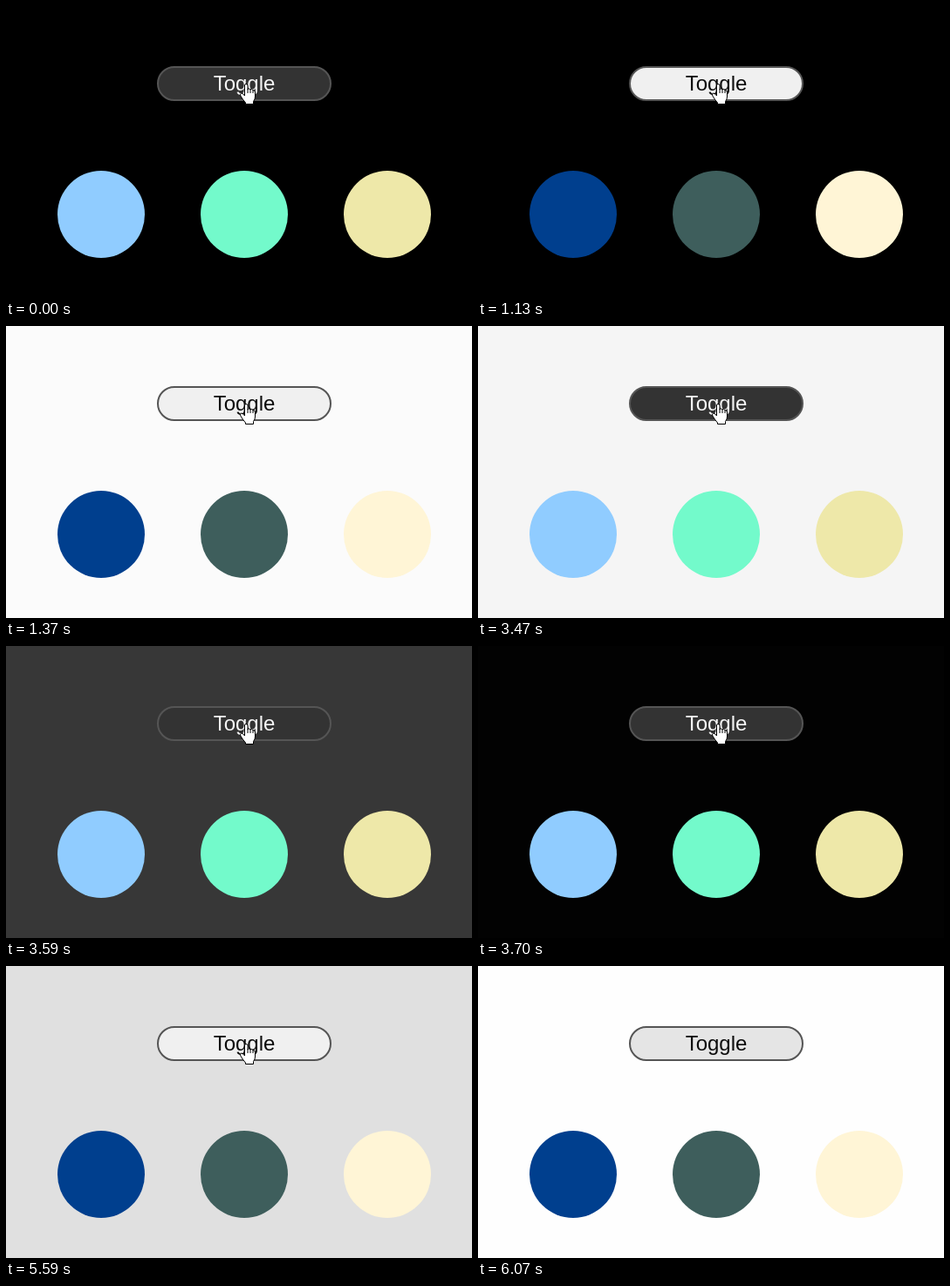
Recreate the animation shown at these times as an HTML page. Size 534 by 335 pixels, loop 6380 ms.

```html
<!DOCTYPE html>
<html lang="en">
<head>
<meta charset="utf-8">
<title>Theme toggle</title>
<style>
  html, body { margin: 0; width: 100%; height: 100%; overflow: hidden; background: #000; }
  svg { display: block; width: 534px; height: 335px; background: var(--page); }
  svg {
    --face: #333; --ink: #f5f5f5;
    --a: #90ccff; --b: #73facb; --c: #eee8a9;
  }
  svg.light {
    --face: #f0f0f0; --ink: #0d0d0d;
    --a: #003f8e; --b: #3e5e5c; --c: #fff5d6;
  }
  svg.light.away { --face: #e5e5e5; }
  .face { fill: var(--face); stroke: #555; stroke-width: 2; }
  text { fill: var(--ink); font: 24px "Liberation Sans", Arial, sans-serif; text-anchor: middle; }
  .cursor path { fill: #fff; stroke: #000; stroke-width: 1; stroke-linejoin: round; }
  .cursor .lines { fill: none; }
  .arrow, .away .hand { display: none; }
  .away .arrow { display: inline; }
</style>
</head>
<body>
<svg id="stage" viewBox="0 0 534 335">
  <rect class="face" x="174" y="70" width="198" height="38" rx="19"/>
  <text x="273" y="97">Toggle</text>
  <circle cx="109" cy="239" r="50" fill="var(--a)"/>
  <circle cx="273" cy="239" r="50" fill="var(--b)"/>
  <circle cx="437" cy="239" r="50" fill="var(--c)"/>
  <g id="cursor" class="cursor">
    <g class="hand">
      <path d="M273.5 103V91Q273.5 89.5 275 89.5Q277 89.5 277 91.5V95.5Q278.5 94 280 95.8Q281.8 94.8 283 96.7Q285.5 96.3 285.5 99V104Q285.5 107 283.5 109.5V112.5H274.5V111Q271 107 268.8 103Q267.8 100.8 269.5 100.2Q271.5 99.8 273.5 103Z"/>
      <path class="lines" d="M277 95V100M280 96V100M283 97V100"/>
    </g>
    <path class="arrow" d="M275.5 89.5V106L279.2 102.5L281.7 108.5L284.2 107.4L281.7 101.5H287Z"/>
  </g>
</svg>
<script>
  const LOOP = 6380, FRAME = 60, FADE = 280, WHITE = 254;
  const LEAVE = 5710, GONE = 6070;
  // lead: how far the page fade has run when the button flips
  const flips = [
    { at: 0, lead: FADE, span: 0, light: false },
    { at: 1130, lead: 0, span: 240, light: true },
    { at: 3470, lead: 15, span: 230, light: false },
    { at: 5470, lead: 47, span: 240, light: true }
  ];
  const stage = document.getElementById('stage');
  const cursor = document.getElementById('cursor');

  // cubic-bezier(.25, .1, .25, 1)
  function ease(x) {
    if (x >= 1) return 1;
    let lo = 0, hi = 1;
    for (let i = 0; i < 24; i++) {
      const u = (lo + hi) / 2;
      if (0.75 * u * (1 - u) + u ** 3 < x) lo = u; else hi = u;
    }
    return 0.3 * lo * (1 - lo) ** 2 + 3 * lo * lo * (1 - lo) + lo ** 3;
  }

  const hold = (dt, span) => dt >= span ? span : Math.floor(dt / FRAME) * FRAME;

  function render(t) {
    const flip = flips.filter(f => f.at <= t).pop();
    const p = ease((flip.lead + hold(t - flip.at, flip.span)) / FADE);
    const grey = Math.round(WHITE * (flip.light ? p : 1 - p));
    stage.style.setProperty('--page', `rgb(${grey},${grey},${grey})`);
    stage.classList.toggle('light', flip.light);

    const span = GONE - LEAVE;
    const q = (hold(Math.max(0, t - LEAVE), span) / span) ** 1.5;
    stage.classList.toggle('away', 260 * q > 18);
    cursor.setAttribute('transform', `translate(${282 * q} ${260 * q})`);
  }

  const start = performance.now();
  function tick() {
    render((performance.now() - start) % LOOP);
    requestAnimationFrame(tick);
  }
  tick();
</script>
</body>
</html>
```
